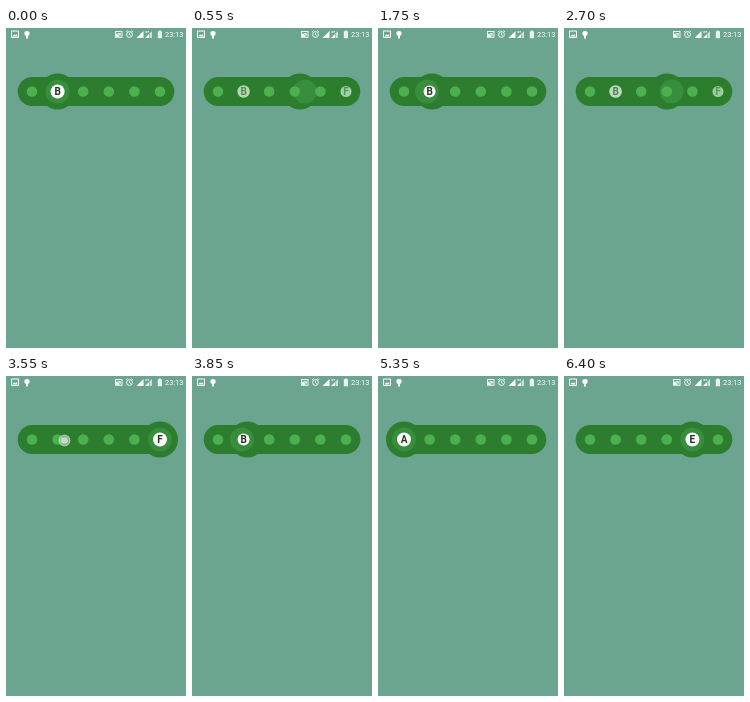
Recreate the animation shown at these times as an HTML page. Size 180x320 px, loop 6450 ms.

```html
<!DOCTYPE html>
<html lang="en">
<head>
<meta charset="utf-8">
<title>Step selector</title>
<style>
  html, body { margin: 0; width: 100%; height: 100%; overflow: hidden; background: #6ba58f; }
  svg { display: block; width: 100vw; height: 100vh; }
  text { font-family: Roboto, sans-serif; }
  .letter { font-size: 10px; font-weight: 700; fill: #1c3a1e; text-anchor: middle; }
</style>
</head>
<body>
<svg viewBox="0 0 180 320">
  <defs><clipPath id="view"><rect x="8" y="45" width="164" height="37"/></clipPath></defs>
  <rect width="180" height="320" fill="#6ba58f"/>

  <g fill="#fff">
    <path fill-rule="evenodd" d="M6 2.5h6q1 0 1 1v5.500q0 1-1 1h-6q-1 0-1-1v-5.500q0-1 1-1zM6 3.500v5.500h6v-5.500zM6.500 8.500l1.600-2.300 1.200 1.300 1.100-1.500 1.300 2.500z"/>
    <path d="M18.300 5q0-2 2.700-2t2.700 2q0 2.600-1.700 3v2.500h-2v-2.500q-1.700-.4-1.700-3z"/>
    <path fill-rule="evenodd" d="M109 3h7.500v6.700h-7.500zM110 4v1.500q3 .4 3.600 3.200h1.900v-4.700z" opacity=".9"/>
    <path d="M111.500 5h3.300v2.800h-1q-.6-1.700-2.300-2z" opacity=".8"/>
    <path d="M130.500 10l7-7v7z"/>
    <path d="M139 10l4-4v4z"/>
    <path d="M143.500 5.500l2.500-2.500v7h-2.500z" opacity=".65"/>
    <path d="M139.500 3h1.300v2h-1.300zM141.500 3h1.500v1.500h-1.500z" opacity=".75"/>
    <path d="M153 2.500h1.800v.8h1.200v6.900h-4.200v-6.900h1.200z" opacity=".85"/>
    <text x="159" y="9.200" font-size="7.400">23:13</text>
  </g>
  <g fill="none" stroke="#fff" stroke-width=".9">
    <circle cx="123.500" cy="6.500" r="2.900"/>
    <path d="M123.500 4.800v2l1.200.7M120 4l1.600-1.400M127 4l-1.600-1.400"/>
  </g>

  <g clip-path="url(#view)">
    <rect x="11.700" y="49" width="156.600" height="29" rx="14.500" fill="#2c7d2e"/>
    <circle id="outer" cy="63.500" r="18" fill="#2c7d2e"/>
    <circle id="inner" cy="63.500" r="12" fill="#388e3c"/>
    <g id="dots"></g>
  </g>
  <g id="touch">
    <circle r="6" fill="#c9d6c8" fill-opacity=".6"/>
    <circle r="5.200" fill="none" stroke="#e6eee5" stroke-opacity=".45" stroke-width=".8"/>
    <circle r="3.300" fill="#e8eee6" fill-opacity=".65"/>
  </g>
</svg>
<script>
const LOOP = 6450, REST = 5.3, FULL = 7;
const GREEN = [76, 175, 80], WHITE = [255, 255, 255];
// tap time, start of the move, target dot, touch point
const moves = [
  { tap: 400, go: 460, to: 5, x: 154, y: 66 },
  { tap: 1450, go: 1500, to: 1, x: 52, y: 66 },
  { tap: 2500, go: 2620, to: 5, x: 149, y: 66 },
  { tap: 3550, go: 3610, to: 1, x: 58.5, y: 64.5 },
  { tap: 4700, go: 4750, to: 0, x: 20, y: 70 },
  { tap: 5700, go: 5760, to: 4, x: 132, y: 69 }
];
const $ = id => document.getElementById(id);
const xOf = i => 26 + i * 25.6;
const clamp = v => Math.max(0, Math.min(1, v));
const mix = (a, b, p) => a + (b - a) * p;

function add(parent, tag, attrs) {
  const el = document.createElementNS("http://www.w3.org/2000/svg", tag);
  for (const k in attrs) el.setAttribute(k, attrs[k]);
  return parent.appendChild(el);
}

const dots = [..."ABCDEF"].map((ch, i) => {
  const circle = add($("dots"), "circle", { cx: xOf(i), cy: 63.5 });
  const letter = add($("dots"), "text", { x: xOf(i), y: 67.1, class: "letter" });
  letter.textContent = ch;
  return { circle, letter };
});

function overshoot(p, tension) {
  const u = p - 1;
  return 1 + u * u * ((tension + 1) * u + tension);
}

function paintDot(dot, size, tint) {
  dot.circle.setAttribute("r", mix(REST, FULL, size));
  dot.circle.setAttribute("fill", `rgb(${GREEN.map((c, k) => Math.round(mix(c, WHITE[k], tint)))})`);
  dot.letter.setAttribute("opacity", tint);
}

function draw(t) {
  let from = 1, to = 1, age = LOOP;
  for (const m of moves) {
    if (t < m.go) break;
    from = to;
    to = m.to;
    age = t - m.go;
  }
  const p = clamp(age / 500);
  $("outer").setAttribute("cx", mix(xOf(from), xOf(to), overshoot(p, 0.8)));
  $("inner").setAttribute("cx", mix(xOf(from), xOf(to), overshoot(p, 1.2)));

  const fade = clamp(age / 200);
  dots.forEach((dot, i) => {
    if (i === to) paintDot(dot, clamp(age / 600), fade);
    else if (i === from) paintDot(dot, 1 - fade, 1 - fade);
    else paintDot(dot, 0, 0);
  });

  const press = moves.find(m => t >= m.tap && t < m.go + 50);
  $("touch").setAttribute("visibility", press ? "visible" : "hidden");
  if (press) $("touch").setAttribute("transform", `translate(${press.x} ${press.y})`);
}

const begin = performance.now();
function tick() {
  draw((performance.now() - begin) % LOOP);
  requestAnimationFrame(tick);
}
tick();
</script>
</body>
</html>
```
